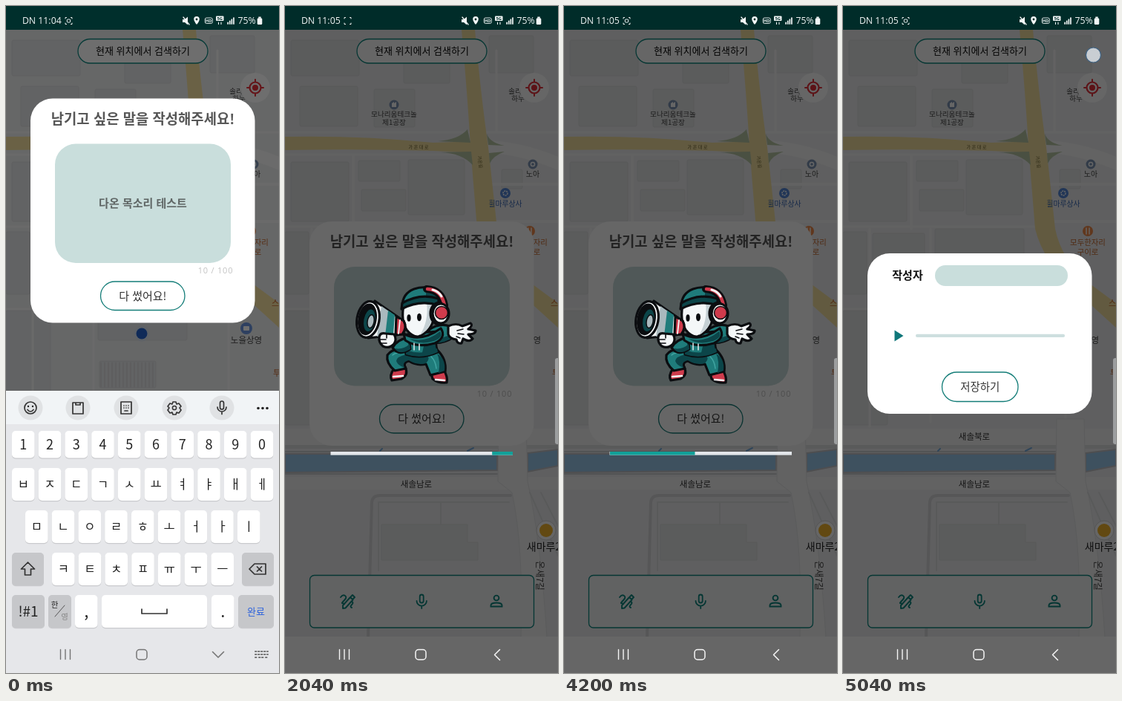
Animation of 368x898 px, one loop 5.16 s. Source, as an HTML page:

```html
<!DOCTYPE html>
<html lang="ko">
<head>
<meta charset="utf-8">
<style>
html,body{margin:0;width:100%;height:100%;overflow:hidden;background:#666}
svg{display:block;width:368px;height:898px}
text{font-family:"Noto Sans CJK KR","Noto Sans CJK",sans-serif}
.lat{font-family:"Open Sans","Noto Sans",sans-serif}
</style>
</head>
<body>
<svg id="stage" viewBox="0 0 368 898" xmlns="http://www.w3.org/2000/svg"></svg>
<script>
const LOOP = 5160, STEP = 120;
const TEAL = '#147d78', MINT = '#c9dedc', INK = '#0b0d10';

const rect = (x, y, w, h, fill, r = 0, more = '') =>
  `<rect x="${x}" y="${y}" width="${w}" height="${h}" rx="${r}" fill="${fill}" ${more}/>`;
const circ = (x, y, r, fill, more = '') => `<circle cx="${x}" cy="${y}" r="${r}" fill="${fill}" ${more}/>`;
const oval = (x, y, rx, ry, fill, more = '') => `<ellipse cx="${x}" cy="${y}" rx="${rx}" ry="${ry}" fill="${fill}" ${more}/>`;
const path = (d, fill, more = '') => `<path d="${d}" fill="${fill}" ${more}/>`;
const line = (d, color, w, more = '') =>
  path(d, 'none', `stroke="${color}" stroke-width="${w}" stroke-linecap="round" stroke-linejoin="round" ${more}`);
// y is the optical centre of the line
const text = (x, y, size, str, fill, weight = 400, more = '') =>
  `<text x="${x}" y="${y + size * .36}" font-size="${size}" font-weight="${weight}" fill="${fill}" text-anchor="middle" ${more}>${str}</text>`;
const group = (id, body, more = '') => `<g id="${id}" ${more}>${body}</g>`;

function mapLayer() {
  const edge = 'stroke="#dcdddf" stroke-width="1"';
  const blocks = [
    [8, 46, 92, 48], [120, 112, 55, 51], [160, 58, 62, 46], [20, 108, 78, 54], [275, 40, 60, 50],
    [8, 210, 78, 80], [99, 208, 56, 28], [103, 247, 60, 29], [166, 207, 76, 74], [0, 304, 32, 84],
    [40, 306, 70, 100], [124, 300, 120, 150], [0, 410, 60, 154], [292, 220, 28, 26], [126, 478, 76, 36]
  ].map(b => rect(...b, '#e5e6e8', 2, edge)).join('');
  const hatch = Array.from({length: 15}, (_, i) => `M${128 + i * 5} 480v33`).join('');
  const yellow = '#f6e2a0';
  return rect(0, 0, 368, 898, '#eeeff0') + blocks
    + line(hatch, '#cfd0d3', 1)
    + line('M0 170H368M0 200H230M92 200V300M0 297H262M118 300V560M36 300V566M285 60V170M300 360V560M0 408H120', '#f7f7f7', 3)
    + line('M262 190Q310 188 368 212', '#f8f8f8', 17)
    + line('M272 240H368M280 290H368', '#f7f7f7', 4)
    + path('M0 176Q100 174 200 184L262 182V198L200 195Q100 192 0 194Z', yellow)
    + path('M238 32Q246 120 250 190L259 300Q270 345 315 385L368 433V400L330 372Q294 340 286 300L274 190Q264 120 256 32Z', yellow)
    + path('M206 182Q234 180 246 166L250 184ZM210 197Q238 198 253 214L251 196ZM272 172Q276 184 296 188L274 187ZM276 212Q280 202 296 196L275 198Z', '#b9c9a6')
    + text(180, 190, 6, '가 온 대 로', '#6b6030', 500)
    + text(263, 210, 6, '가온길', '#6b6030', 500, 'transform="rotate(82 263 210)"')
    // river and riverside streets
    + rect(0, 569, 368, 22, '#f6f6f6') + rect(0, 591, 368, 5, '#e0e1e3')
    + rect(0, 634, 368, 17, '#f6f6f6')
    + path('M0 603H286V625L0 628ZM327 602L368 597V619L327 627Z', '#9ccbef', 'stroke="#c3c5c9" stroke-width="2"')
    + line('M0 600H286M0 630H286', '#cfd1d4', 2)
    + path('M288 556H325L327 640Q345 720 353 850H318Q322 730 306 655L287 640Z', '#f5f5f6', 'stroke="#e4e5e6"')
    + line('M112 850L117 668Q118 659 128 659H304', '#d8d9db', 4)
    + path('M130 698H246V722H260V746H130Z', '#e5e6e8', edge)
    + line('M126 760V668H302M210 668V698M345 655L368 700M330 655L368 740', '#e0e1e3', 2)
    + line('M246 599l8 -4M128 599l3 -3', '#78aee0', 2)
    + text(177, 580, 11.5, '새솔북로', '#333', 500) + text(177, 644, 11.5, '새솔남로', '#333', 500)
    + text(343, 767, 12, '온새7길', '#444', 400, 'transform="rotate(90 343 767)"')
    // places
    + circ(147, 133, 6.5, '#7d95b5') + path('M144 136v-5l3 -2v2l3 -2v7z', '#fff')
    + text(147, 146, 9.6, '모나리움테크놀', '#444', 500) + text(147, 157, 9.6, '제1공장', '#444', 500)
    + circ(334, 213, 6.5, '#7d95b5') + circ(334, 213, 2.6, 'none', 'stroke="#fff" stroke-width="1.5"')
    + text(334, 226, 10, '노아', '#444', 500)
    + circ(297, 252, 7, '#5688d8') + circ(297, 252, 3, 'none', 'stroke="#fff" stroke-width="1.5" stroke-dasharray="2 1"')
    + text(297, 266, 9.8, '휠마루상사', '#3565b5', 500)
    + circ(330, 303, 7, '#f08a4a') + line('M328 299v8M332 299v8', '#fff', 1.4)
    + text(330, 318, 10.4, '모두한자리', '#c8682c', 500) + text(330, 331, 10.4, '구이로', '#c8682c', 500)
    + circ(270, 387, 5, '#a9b3c0') + circ(328, 374, 5, '#a9b3c0')
    + circ(324, 434, 8, '#6a96e0') + rect(320, 431, 8, 6, '#fff', 1)
    + text(324, 450, 11.5, '노을상영', '#444', 500)
    + text(363, 400, 11, '스', '#c8682c', 500) + text(365, 494, 11, '투', '#c8682c', 500)
    + text(310, 115, 9.5, '솔리', '#444', 500) + text(314, 125, 9.5, '하누', '#444', 500)
    + circ(352, 706, 13, '#fff', 'stroke="#d5d5d5"') + circ(352, 706, 9, '#f5b82e')
    + text(349, 728, 14, '새마루2', '#222', 500)
    + circ(183, 441, 10.5, '#dbe4f0') + circ(183, 441, 7.5, '#2462cc');
}

function appLayer() {
  const c = '#0c8880', frame = `stroke="${c}" stroke-width="1.3"`;
  return rect(0, 0, 368, 32, '#006e67')
    + rect(97, 44.5, 175, 32.5, '#fff', 16.2, frame)
    + circ(336, 110, 20, '#fff')
    + circ(336, 110, 7.5, 'none', 'stroke="#e8303a" stroke-width="2.2"') + circ(336, 110, 4, '#e8303a')
    + line('M336 99v3M336 118v3M325 110h3M344 110h3', '#e8303a', 2)
    + rect(33.5, 766.5, 302, 70.5, '#f4f5f5', 6, frame)
    // pencil with a squiggle, microphone, person
    + line('M75 796q3 -4 6 -2t-1 6t-3 4t3 1M90 802q3 1 0 4t0 4', c, 1.9)
    + line('M78 811v-4l10 -11l3.500 3.500l-10 11zM89 795l2 -2l3 3l-2 2', c, 1.9)
    + rect(181.7, 792.5, 5, 11, 'none', 2.5, `stroke="${c}" stroke-width="1.8"`)
    + line('M177.500 801a6.700 6.700 0 0 0 13.400 0M184.200 808v3', c, 1.8)
    + circ(285, 797, 3.4, 'none', `stroke="${c}" stroke-width="1.9"`)
    + path('M277.500 808.500v-1.500q0 -3.500 7.500 -3.500t7.500 3.500v1.500z', 'none', `stroke="${c}" stroke-width="1.9"`)
    + rect(0, 849, 368, 49, '#fff');
}

const pill = (x, y, w, h, label, size) =>
  rect(x, y, w, h, 'none', h / 2, `stroke="${TEAL}" stroke-width="1.3"`) + text(x + w / 2, y + h / 2, size, label, '#333', 300);

const noteCard = () => rect(33, 124.5, 302.5, 302, '#fff', 30)
  + text(184.5, 152, 18.8, '남기고 싶은 말을 작성해주세요!', '#575757', 700)
  + rect(66, 185.5, 237, 160.5, MINT, 28)
  + group('note', text(184.5, 266, 15, '다온 목소리 테스트', '#5f6665', 700))
  + text(282.5, 356.5, 11, '10 / 100', '#c2c2c2', 400, 'class="lat" letter-spacing=".8"')
  + pill(127.5, 371, 113.5, 38.5, '다 썼어요!', 15);

const saveCard = () => rect(33, 333, 302.5, 216, '#fff', 30)
  + text(87, 363, 15, '작성자', '#111', 700)
  + rect(124, 349, 179, 28, MINT, 14)
  + path('M69.500 436.500L81.500 444L69.500 451.500Z', '#10777a')
  + rect(98, 441.7, 201, 4.4, '#cddfdf', 2)
  + pill(133.5, 493, 102.5, 39.5, '저장하기', 14.4);

function heroLayer() {
  const teal = '#1f7c7b', dark = '#0c4549', red = '#cf3b4c', white = '#f4f7f8', gray = '#a9b9be';
  const plain = 'stroke="none"';
  const fist = path('M127 446Q128 439 136 441L147 442Q151 449 147 455Q140 462 132 458Q126 453 127 446Z', white)
    + line('M128 449h8M130 454h7M137 442v5', INK, 1.6);
  const horn = path('M121 397L160 424Q165 433 158 442L112 447Z', white)
    + path('M130 404L143 413L141 443L124 445Z', gray, plain)
    + path('M139 410L148 416L146 443L135 444Z', teal, plain)
    + path('M150 418L160 424Q165 433 158 442L149 443Z', red)
    + line('M155 423L153 441', white, 1.8)
    + '<g transform="rotate(10 112 422)">' + oval(112, 422, 15, 24.5, white) + oval(111, 422, 11, 20, INK)
    + oval(114, 423, 7.5, 15, dark, plain) + oval(116, 424, 4.5, 9, gray, 'stroke-width="1.5"') + '</g>';
  return path('M194 436Q208 426 222 431L227 446Q212 456 196 453Z', teal)
    + path('M197 447Q212 449 225 441L227 446Q212 456 196 453Z', dark, plain)
    + path('M220 431Q231 426 239 431L250 427Q254 430 247 435L257 437Q257 442 247 442L253 448Q249 453 240 448L238 454Q232 455 231 449Q222 448 220 442Z', white)
    + line('M232 437l8 -2M233 441l8 1M231 445l5 2', INK, 1.5)
    + path('M147 488L162 486Q167 497 157 502L144 504Q140 498 147 488Z', red) + line('M146 499l13 -1', white, 2.6)
    + path('M197 495L214 490Q220 500 218 507Q206 508 199 502Z', red) + line('M203 503l12 1', white, 2.6)
    // trousers
    + path('M164 464Q146 459 138 470Q136 481 148 491L163 488Q158 480 167 478Q178 485 190 482L196 497L216 492Q218 475 205 463Z', teal)
    + path('M164 469Q150 472 150 478Q152 484 161 487Q157 479 167 477Q178 484 190 481Q198 472 188 470ZM205 468Q210 478 207 494L215 491Q217 475 205 468Z', dark, plain)
    + line('M145 470q3 -3 8 -3M197 472q6 6 7 16', '#3fa3a0', 1.6)
    // hoodie
    + path('M165 442Q161 456 163 469Q184 476 206 466Q201 452 205 438Z', teal)
    + path('M187 458Q199 456 202 447Q202 458 205 465Q194 470 184 471Z', dark, plain)
    + path('M163 463Q184 471 205 461L206 466Q184 476 163 469Z', dark, plain)
    + path('M167 446Q151 449 145 460Q153 472 169 462Z', teal)
    + path('M148 461Q160 463 168 455L169 462Q154 471 148 461Z', dark, plain)
    + path('M160 441Q182 454 210 434Q218 446 202 454Q178 461 162 450Z', teal)
    + path('M168 448Q190 454 209 438Q214 446 201 451Q182 457 168 448Z', dark, plain)
    + line('M174 454v9M181 455v8', white, 1.4)
    // head
    + path('M160 402Q156 424 164 436Q172 446 180 445Q198 438 201 418L200 398Z', white)
    + path('M191 400L200 400Q202 432 182 443Q194 424 191 400Z', '#c5d0d4', plain)
    + path('M158 405Q158 387 174 381Q192 375 205 385L207 400Q182 391 158 405Z', teal)
    + path('M190 380Q202 381 205 386L206 398Q198 394 190 394Z', dark, plain)
    + path('M157 408L158 400Q182 386 207 394L207 403Q182 395 157 408Z', dark)
    + line('M191 381Q211 382 215 403', INK, 10) + line('M192 381Q211 382 215 403', red, 4.5)
    + line('M199 382Q207 384 211 391', white, 3)
    + oval(207, 414, 11, 14.5, dark) + oval(210, 414, 11, 13, white) + circ(211, 413, 8.5, red, 'stroke-width="1.5"')
    + group('eyes', oval(167, 420, 2.6, 4.8, INK) + oval(181, 419, 3, 5.2, INK), plain)
    + group('shut', line('M163 421l7 -1M177 420l9 -2', INK, 1.8))
    + group('horn', horn) + group('fist', fist);
}

function keyboardLayer() {
  const ink = '#222', gray = '#c6c7ca';
  const key = (x, y, w, h, label, size = 17, fill = '#fff', color = ink) =>
    rect(x, y + 1.2, w, h, '#c9cacd', 5) + rect(x, y, w, h, fill, 5) + text(x + w / 2, y + h / 2, size, label, color);
  const row = (chars, x, y, h, size) => [...chars].map((c, i) => key(x + i * 35.75, y, 30.5, h, c, size)).join('');
  const ico = d => line(d, '#333', 1.7);
  return rect(0, 518, 368, 335, '#e6e7ea') + rect(0, 518, 368, 45, '#f1f4f6')
    + [33, 97, 162, 227, 291].map(x => circ(x, 541, 16.5, '#e0e2e4')).join('')
    + circ(33, 541, 8, 'none', 'stroke="#333" stroke-width="1.700"') + circ(30, 539, 1.2, ink) + circ(36, 539, 1.2, ink)
    + ico('M29 543.500q4 5 8 0')
    + ico('M90 534h14v15h-14zM94 534v3h6v-3') + ico('M155 533h14v16h-14z')
    + line('M159 538h0M162 538h0M165 538h0M159 541h0M162 541h0M165 541h0M160 545h4', '#333', 1.7)
    + ico('M225 533h4l1 3 3 -1 3 4 -2 2 2 3 -3 4 -3 -1 -1 3h-4l-1 -3 -3 1 -3 -4 2 -3 -2 -2 3 -4 3 1z')
    + circ(227, 541, 2.6, 'none', 'stroke="#333" stroke-width="1.500"')
    + rect(288.5, 532, 5, 11, 'none', 2.5, 'stroke="#333" stroke-width="1.700"') + ico('M285 540a6 6 0 0 0 12 0M291 546.500v3')
    + [340, 346, 352].map(x => circ(x, 541.5, 1.8, ink)).join('')
    + row('1234567890', 8, 572, 36.5, 18)
    + row('ㅂㅈㄷㄱㅅㅛㅕㅑㅐㅔ', 8, 622, 44, 16.5)
    + row('ㅁㄴㅇㄹㅎㅗㅓㅏㅣ', 26, 679, 44, 16.5)
    + row('ㅋㅌㅊㅍㅠㅜㅡ', 62, 736, 44, 16.5)
    + key(8, 736, 43, 44, '', 1, gray) + key(318, 736, 43, 44, '', 1, gray)
    + ico('M29.500 749l9 9h-5v8h-8v-8h-5z')
    + ico('M335 751h15v14h-15l-7 -7zM338.500 755l6 6M344.500 755l-6 6')
    + key(8, 793, 44, 44, '!#1', 19, gray) + key(57, 793, 31, 44, '', 1, gray)
    + text(65.5, 806, 10.5, '한', ink) + text(79, 822, 10.5, '영', '#888') + line('M66 822L79 807', '#555', 1)
    + key(93, 793, 30.5, 44, ',', 22) + key(129, 793, 142, 44, '') + key(277, 793, 30.5, 44, '.', 22)
    + ico('M183 812v6h34v-6')
    + key(313, 793, 48, 44, '완료', 13, gray, '#2c62dc');
}

function statusLayer() {
  const w = '#f2f6f6';
  const label = (x, str) => text(x, 19.5, 12.3, str, w, 500, 'class="lat"');
  return label(31, 'DN') + `<text id="clock" class="lat" x="59" y="24" font-size="12.300" font-weight="500" fill="${w}" text-anchor="middle"></text>`
    + line('M81.500 15.500h-1.500v1.500M87.500 15.500h1.500v1.500M81.500 24.500h-1.500v-1.500M87.500 24.500h1.500v-1.500', w, 1)
    + group('rec', rect(82.3, 18, 4.4, 4, 'none', 1, `stroke="${w}"`))
    + path('M238 18h3l4 -3.500v11l-4 -3.500h-3z', w) + line('M239 15l8 10', w, 1.3)
    + path('M257 25q-3.800 -4.500 -3.800 -7.300a3.800 3.800 0 0 1 7.600 0q0 2.800 -3.800 7.300z', w) + circ(257, 18, 1.4, '#002e2b')
    + rect(268.3, 16, 10, 7.5, 'none', 2, `stroke="${w}" stroke-width=".9"`) + text(273.3, 19.8, 5.6, 'HD', w, 700, 'class="lat"')
    + rect(283, 13.5, 10.5, 6.5, w, 1) + text(288.3, 16.7, 5.8, '5G', '#002e2b', 700, 'class="lat"') + line('M286.500 22v2.500M290 22v2.500', w, 1.1)
    + [0, 1, 2, 3].map(i => rect(298.3 + i * 2.6, 21.7 - i * 2.1, 1.7, 3 + i * 2.1, w)).join('')
    + label(324.5, '75%') + rect(338.7, 16.3, 6.6, 8.7, w, 1.5) + rect(340.3, 14.5, 3.4, 2, w);
}

const navLayer = () => line('M73.500 866.500v13M80 866.500v13M86.500 866.500v13', 'currentColor', 1.4)
  + rect(176, 866.5, 14, 13.5, 'none', 4, 'stroke="currentColor" stroke-width="1.500"')
  + group('back', line('M289.500 866.500L282.500 873.500L289.500 880.500', 'currentColor', 1.5))
  + group('down', line('M278.500 869.500L286 877L293.500 869.500', 'currentColor', 1.6)
    + line('M336 869h17M336 873h17M336 877h3M350 877h3M341 877h7', 'currentColor', 2, 'stroke-dasharray="1.500 2.500"'));

document.getElementById('stage').innerHTML =
  mapLayer() + appLayer() + group('under', rect(0, 0, 368, 898, '#000'))
  + text(184.5, 60.5, 13, '현재 위치에서 검색하기', '#050505', 500)
  + group('card', noteCard()) + group('over', rect(0, 0, 368, 898, '#000'))
  + group('load', group('bar', rect(61.5, 600, 245.5, 4.6, '#e3e6ea') + path('', '#12a099', 'id="run"'))
    + group('hero', heroLayer(), `stroke="${INK}" stroke-width="3.200" stroke-linejoin="round"`))
  + group('save', saveCard())
  + group('edge', rect(364, 474, 8, 116, '#9c9e9f', 3))
  + group('keys', keyboardLayer()) + group('navbg', rect(0, 849, 368, 49, '#e6e7ea'))
  + group('nav', navLayer()) + statusLayer()
  + group('touch', circ(337.5, 66, 10, '#c9ced3', 'stroke="#3f6384" stroke-width="1.200"'));

const el = {};
document.querySelectorAll('[id]').forEach(n => el[n.id] = n);
const set = (id, name, v) => el[id].setAttribute(name, v);
const fade = (id, v) => set(id, 'opacity', v);
const clamp = v => Math.min(1, Math.max(0, v));

// linear track through [time, value] pairs
function track(t, ...keys) {
  if (t <= keys[0][0]) return keys[0][1];
  for (let i = 1; i < keys.length; i++) {
    const [a, u] = keys[i - 1], [b, v] = keys[i];
    if (t <= b) return u + (v - u) * (t - a) / (b - a);
  }
  return keys[keys.length - 1][1];
}

function bezier(p, x1, y1, x2, y2) {
  const at = (s, a, b) => 3 * a * s * (1 - s) ** 2 + 3 * b * s * s * (1 - s) + s ** 3;
  let lo = 0, hi = 1;
  for (let i = 0; i < 24; i++) {
    const m = (lo + hi) / 2;
    if (at(m, x1, x2) < p) lo = m; else hi = m;
  }
  return at(lo, y1, y2);
}

// indeterminate progress: two segments per 1800 ms cycle
function runPath(ms) {
  const c = ms % 1800;
  const ease = (from, len, ...b) => {
    const p = clamp((c - from) / len);
    return p === 0 || p === 1 ? p : bezier(p, ...b);
  };
  const seg = (tail, head) => head > tail
    ? `M${61.5 + 245.5 * tail} 600H${61.5 + 245.5 * head}v4.6H${61.5 + 245.5 * tail}z` : '';
  return seg(ease(333, 750, .4, 0, 1, 1), ease(0, 750, .2, 0, .8, 1))
    + seg(ease(1267, 533, .1, 0, .45, 1), ease(1000, 567, 0, 0, .65, 1));
}

function draw(time) {
  const t = Math.floor((time % LOOP) / STEP) * STEP;
  const p = clamp((t - 120) / 340), slide = p * p * (3 - 2 * p);
  const typing = t < 480;
  const under = track(t, [480, .57], [720, 0], [4680, 0], [4800, .3], [4920, .42], [5040, .6]);
  const over = track(t, [480, 0], [720, .6], [4680, .6], [4800, .12], [4920, 0]);
  fade('under', under);
  fade('over', over);

  const rest = track(t, [480, 162.5], [720, 165.5], [4680, 165.5], [4800, 162.8]);
  set('card', 'transform', `translate(0 ${typing ? 162.5 * slide : rest})`);
  fade('card', track(t, [4680, 1], [4800, .93], [4920, .2], [5040, 0]));
  fade('note', track(t, [480, 1], [720, 0], [4680, 0], [4800, .8]));
  fade('save', track(t, [4800, 0], [4920, .6], [5040, 1]));

  fade('load', track(t, [480, 0], [720, 1], [4680, 1], [4800, .78], [4920, .1], [5040, 0]));
  set('bar', 'transform', `translate(0 ${track(t, [4680, 0], [4800, -3])})`);
  set('run', 'd', runPath(track(t, [513, 0], [960, 472], [2040, 1630], [2760, 2388], [4200, 3956], [4800, 4410], [5040, 4620])));

  const beat = t % 1080, raised = beat >= 240 && beat < 840;
  const blink = Math.abs(t % 2160 - 960) < 120;
  set('horn', 'transform', raised ? 'rotate(31 158 436)' : '');
  set('fist', 'transform', raised ? 'translate(8 -9)' : '');
  fade('eyes', blink ? 0 : 1);
  fade('shut', blink ? 1 : 0);

  set('keys', 'transform', `translate(0 ${336 * slide})`);
  fade('keys', slide < 1 ? 1 : 0);
  fade('navbg', 1 - slide);
  fade('edge', typing ? 0 : 1);
  fade('down', typing ? 1 : 0);
  fade('back', typing ? 0 : 1);
  const dim = 1 - (1 - under) * (1 - over);
  set('nav', 'color', typing || dim < .45 ? '#757575' : '#f6f6f6');

  el.clock.textContent = typing ? '11:04' : '11:05';
  const pulse = t % 840;
  fade('rec', pulse >= 120 && pulse <= 600 ? 0 : 1);
  fade('touch', t >= 5040 ? 1 : 0);
}

const start = performance.now();
function tick() {
  draw(performance.now() - start);
  requestAnimationFrame(tick);
}
tick();
</script>
</body>
</html>
```
